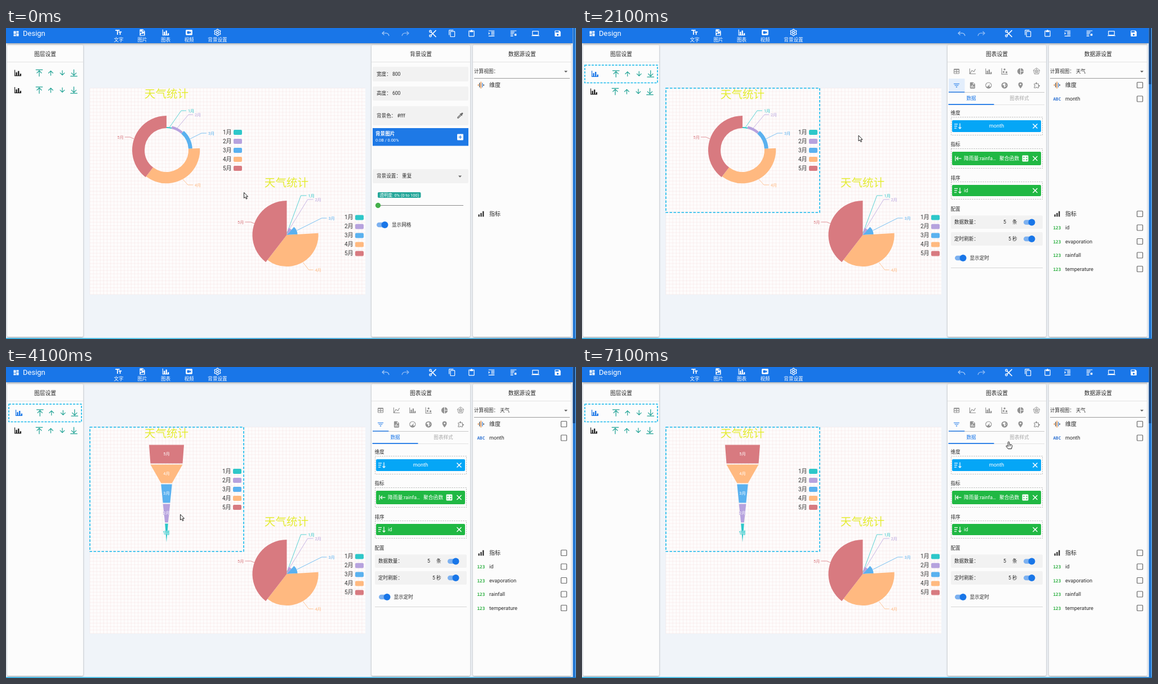
An HTML page with a canvas that plays this animation: 1012 px wide and 553 px high, repeating every 8000 ms.

```html
<!DOCTYPE html>
<html lang="zh-CN">
<head>
<meta charset="utf-8">
<title>Design</title>
<style>
html,body{margin:0;width:100%;height:100%;overflow:hidden;background:#f0f4f9}
canvas{display:block;width:1012px;height:553px}
</style>
</head>
<body>
<canvas id="stage" width="1012" height="553"></canvas>
<script>
const c = document.getElementById('stage').getContext('2d');
const FONT = 'Roboto, "Noto Sans CJK SC", "Noto Sans CJK JP", sans-serif';
const BLUE = '#1976e8', CYAN = '#14b8ec', TEAL = '#1fa294', GREEN = '#20b843', GRAY = '#929292', DARK = '#2b2b2b';
const COLORS = ['#2ec7c9', '#b6a2de', '#5ab1ef', '#ffb980', '#d87a80'];
const RAIN = [2.6, 5.9, 9, 26.4, 28.7];
const TOTAL = RAIN.reduce((a, b) => a + b), MAX = RAIN[4];
const month = i => i + 1 + '月';

// 24-unit icon outlines
const ICON = {
  dash: 'M13,3V9H21V3M13,21H21V11H13M3,21H11V15H3M3,13H11V3H3Z',
  text: 'M2,4V7H7V19H10V7H15V4H2M21,9H12V12H15V19H18V12H21V9Z',
  image: 'M14,2H6Q4,2 4,4V20Q4,22 6,22H18Q20,22 20,20V8ZM13,9V3.5L18.5,9ZM6,20L10,14L13,17L16,13L18,20ZM8,9.5A2,2 0 1,0 8,13A2,2 0 1,0 8,9.5Z',
  bars: 'M22,21H2V3H4V19H6V10H10V19H12V6H16V19H18V14H22V21Z',
  video: 'M18,16L14,12.8V16H6V8H14V11.2L18,8M20,4H4A2,2 0 0,0 2,6V18A2,2 0 0,0 4,20H20A2,2 0 0,0 22,18V6A2,2 0 0,0 20,4Z',
  copy: 'M19,21H8V7H19M19,5H8A2,2 0 0,0 6,7V21A2,2 0 0,0 8,23H19A2,2 0 0,0 21,21V7A2,2 0 0,0 19,5M16,1H4A2,2 0 0,0 2,3V17H4V3H16V1Z',
  paste: 'M5,3H9Q12,-1 15,3H19Q21,3 21,5V20Q21,22 19,22H5Q3,22 3,20V5Q3,3 5,3ZM5,5V20H19V5H17V8H7V5Z',
  laptop: 'M4,6H20V16H4M20,18A2,2 0 0,0 22,16V6C22,4.9 21.1,4 20,4H4C2.9,4 2,4.9 2,6V16A2,2 0 0,0 4,18H0V20H24V18Z',
  save: 'M15,9H5V5H15M12,19A3,3 0 1,1 12,13A3,3 0 1,1 12,19M17,3H5C3.9,3 3,3.9 3,5V19A2,2 0 0,0 5,21H19A2,2 0 0,0 21,19V7Z',
  linesA: 'M3,3H21V5H3ZM11,7H21V9H11ZM11,11H21V13H11ZM11,15H21V17H11ZM3,19H21V21H3ZM3,8V16L7,12Z',
  linesB: 'M3,3H21V5H3ZM3,7H15V9H3ZM3,11H13V13H3ZM3,15H11V17H3ZM3,19H11V21H3ZM15,13H21V19H15Z',
  up: 'M13,20H11V8L5.5,13.5L4.1,12.1L12,4.2L19.9,12.1L18.5,13.5L13,8Z',
  top: 'M4.1,11.9L12,4L19.9,11.9L18.5,13.3L13,7.8V22H11V7.8L5.5,13.3ZM2,2H22V4H2Z',
  table: 'M5,4H19A2,2 0 0,1 21,6V18A2,2 0 0,1 19,20H5A2,2 0 0,1 3,18V6A2,2 0 0,1 5,4M5,8V12H11V8H5M13,8V12H19V8H13M5,14V18H11V14H5M13,14V18H19V14H13Z',
  line: 'M16,11.8L20.2,4.5L22,5.5L16.7,14.5L10.2,10.8L5.5,19H22V21H2V3H4V17.5L9.5,8Z',
  scatter: 'M2,2H4V20H22V22H2ZM9,11A3,3 0 1,1 9,17A3,3 0 1,1 9,11ZM12,3A3,3 0 1,1 12,9A3,3 0 1,1 12,3ZM18,12A3,3 0 1,1 18,18A3,3 0 1,1 18,12Z',
  pie: 'M11,2V22C5.9,21.5 2,17.2 2,12C2,6.8 5.9,2.5 11,2M13,2V11H22C21.5,6.2 17.8,2.5 13,2M13,13V22C17.7,21.5 21.5,17.8 22,13Z',
  funnel: 'M6,13H18V11H6M3,6V8H21V6M10,18H14V16H10Z',
  doc: 'M14,2H6Q4,2 4,4V20Q4,22 6,22H18Q20,22 20,20V8ZM13,9V3.5L18.5,9ZM7,19V13H9V19ZM11,19V11H13V19ZM15,19V15H17V19Z',
  gauge: 'M12,2A10,10 0 1,1 12,22A10,10 0 1,1 12,2ZM12,4A8,8 0 0,0 5,16H9L16,8L14,16H19A8,8 0 0,0 12,4Z',
  globe: 'M12,2A10,10 0 1,1 12,22A10,10 0 1,1 12,2ZM10,5L5,10L11,13L10,19L16,15L13,11L16,7ZM18,9L19,14L17,12Z',
  pin: 'M12,11.5A2.5,2.5 0 1,1 12,6.5A2.5,2.5 0 1,1 12,11.5M12,2A7,7 0 0,0 5,9C5,14.2 12,22 12,22C12,22 19,14.2 19,9A7,7 0 0,0 12,2Z',
  puzzle: 'M4,6H9Q9,2 11.5,2T14,6H19V11Q23,11 23,13.5T19,16V21H14Q12,17 10,21H4V16Q8,13 4,11ZM6,8V10Q11,13 6,17V19H9Q12,15 15,19H17V8Z',
  plus: 'M17,13H13V17H11V13H7V11H11V7H13V11H17M19,3H5C3.9,3 3,3.9 3,5V19A2,2 0 0,0 5,21H19A2,2 0 0,0 21,19V5C21,3.9 20.1,3 19,3Z',
  calc: 'M4,2H20Q22,2 22,4V20Q22,22 20,22H4Q2,22 2,20V4Q2,2 4,2ZM5,7V9H10V7ZM14,7V9H19V7ZM5,15V17H10V15ZM14,14V15.5H19V14ZM14,17V18.5H19V17Z',
  signal: 'M3,14H7V21H3ZM10,9H14V21H10ZM17,3H21V21H17Z',
  dropper: 'M19.4,11.1L18,12.5L16.5,11.1L7.6,20H4V16.4L12.9,7.5L11.5,6L12.9,4.6L14.3,6L17,3.3Q19,2 20.7,3.3Q22,5 20.7,7L18,9.7ZM6,17.2V18H6.8L15.1,9.7L14.3,8.9Z'
};
for (const k in ICON) ICON[k] = new Path2D(ICON[k]);

function icon(name, x, y, size, color, flip) {
  c.save();
  c.translate(x, y);
  c.scale(size / 24, (flip ? -1 : 1) * size / 24);
  c.translate(-12, -12);
  c.fillStyle = color;
  c.fill(ICON[name], 'evenodd');
  c.restore();
}
function text(s, x, y, size = 8.6, color = DARK, align = 'left', weight = 400, font = FONT) {
  c.font = `${weight} ${size}px ${font}`;
  c.textAlign = align;
  c.fillStyle = color;
  c.fillText(s, x, y + size * .37);
}
function box(x, y, x2, y2, color, r = 0) {
  c.fillStyle = color;
  c.beginPath();
  c.roundRect(x, y, x2 - x, y2 - y, r);
  c.fill();
}
function line(pts, color, w = 1) {
  c.strokeStyle = color;
  c.lineWidth = w;
  c.beginPath();
  for (let i = 0; i < pts.length; i += 2) c.lineTo(pts[i], pts[i + 1]);
  c.stroke();
}
function dashed(x, y, x2, y2, color, w, dash) {
  c.setLineDash(dash);
  c.strokeStyle = color;
  c.lineWidth = w;
  c.strokeRect(x, y, x2 - x, y2 - y);
  c.setLineDash([]);
}
function disc(x, y, r, color) {
  c.fillStyle = color;
  c.beginPath();
  c.arc(x, y, r, 0, 7);
  c.fill();
}
function triangle(x, y) {
  c.fillStyle = '#666';
  c.beginPath();
  c.moveTo(x - 3, y - 1.5); c.lineTo(x + 3, y - 1.5); c.lineTo(x, y + 1.7);
  c.fill();
}
function toggle(x, y) {
  box(x, y - 4.3, x + 20, y + 4.3, '#7db1f0', 4.3);
  disc(x + 14.5, y, 6, BLUE);
}
function cross(x, y) {
  line([x - 4, y - 4, x + 4, y + 4], '#fff', 1.5);
  line([x - 4, y + 4, x + 4, y - 4], '#fff', 1.5);
}
function panel(x, x2, title) {
  c.save();
  c.shadowColor = 'rgba(0,0,0,.35)';
  c.shadowBlur = 3;
  c.shadowOffsetY = 1;
  box(x, 30, x2, 549, '#fcfcfc', 2);
  c.restore();
  text(title, (x + x2) / 2, 46, 9.8, DARK, 'center');
  line([x, 60.5, x2, 60.5], '#e4e4e4');
}

function turnArrow(x, dir, color) {
  c.save();
  c.translate(x, 10);
  c.scale(dir, 1);
  c.strokeStyle = color;
  c.lineWidth = 1.3;
  c.beginPath();
  c.moveTo(-2.5, -4); c.lineTo(-6, -.8); c.lineTo(-2.5, 2.4);
  c.moveTo(-6, -.8); c.lineTo(1, -.8);
  c.quadraticCurveTo(5, -.6, 6, 4);
  c.stroke();
  c.restore();
}
function scissors(x, y) {
  line([x + 6, y + 6, x - 4, y - 4], '#fff', 1.7);
  line([x + 6, y - 6, x - 4, y + 4], '#fff', 1.7);
  for (const s of [-1, 1]) {
    disc(x - 4, y + s * 4, 2.4, '#fff');
    disc(x - 4, y + s * 4, 1.1, BLUE);
  }
}
function cog(x, y) {
  c.strokeStyle = '#fff';
  c.lineWidth = 1.3;
  c.beginPath();
  for (let i = 0; i <= 72; i++) {
    const a = i / 72 * Math.PI * 2, r = 5.1 + .8 * Math.cos(a * 6);
    c.lineTo(x + r * Math.sin(a), y + r * Math.cos(a));
  }
  c.stroke();
  c.beginPath();
  c.arc(x, y, 2, 0, 7);
  c.stroke();
}
function header() {
  c.save();
  c.shadowColor = 'rgba(0,0,0,.4)';
  c.shadowBlur = 4;
  c.shadowOffsetY = 1;
  box(0, 0, 1006, 27, BLUE);
  c.restore();
  icon('dash', 18, 10, 12, '#fff');
  text('Design', 30, 9.5, 13, '#fff', 'left', 400);
  [['文字', 200, 'text'], ['图片', 242, 'image'], ['图表', 283.5, 'bars'], ['视频', 325, 'video'], ['背景设置', 375.5]]
    .forEach(([s, x, name]) => {
      name ? icon(name, x, 8, 14, '#fff') : cog(x, 8);
      text(s, x, 21.3, 8.6, '#fff', 'center');
    });
  turnArrow(674, 1, '#a3c8f6');
  turnArrow(709, -1, '#8cb9f3');
  scissors(757.5, 10);
  [['copy', 792], ['paste', 826.5], ['linesA', 862], ['linesB', 901], ['laptop', 940], ['save', 979.5]]
    .forEach(([n, x]) => icon(n, x, 9.7, 14, '#fff'));
}

function layerRow(x, y, color) {
  icon('bars', x, y, 14.5, color);
  const gap = color === BLUE ? 1.3 : 0;
  ['top', 'up', 'up', 'top'].forEach((n, i) =>
    icon(n, 59 + i * 20.5 + gap, y, n === 'top' ? 15 : 14, TEAL, i > 1));
}
function layers(sel) {
  panel(2, 137, '图层设置');
  if (sel) {
    dashed(5, 66, 134, 97.5, CYAN, 1.6, [4, 2]);
    layerRow(23, 81.5, BLUE);
    layerRow(21, 113, '#222');
  } else {
    layerRow(21, 80, '#222');
    layerRow(21, 110.5, '#222');
  }
}

function sheet() {
  box(149, 107, 638, 474, '#fefcfc');
  const step = 6.113;
  for (let x = 149; x < 638; x += step) line([x, 107, x, 474], 'rgba(235,190,190,.24)', .8);
  for (let y = 107; y < 474; y += step) line([149, y, 638, y], 'rgba(235,190,190,.24)', .8);
}
function legend(x, y) {
  COLORS.forEach((k, i) => {
    text(month(i), x, y + i * 16, 10, '#333');
    box(x + 19, y + i * 16 - 4, x + 34, y + i * 16 + 5, k, 2);
  });
}
function chartTitle(x, y) { text('天气统计', x, y, 19.6, '#e4ec33', 'center'); }

// leads: start, elbow and end of each label line, relative to the centre
function rose(x, y, inner, leads) {
  let a = -Math.PI / 2;
  RAIN.forEach((v, i) => {
    const b = a + v / TOTAL * Math.PI * 2, r = inner + (61 - inner) * v / MAX;
    c.fillStyle = COLORS[i];
    c.beginPath();
    c.arc(x, y, r, a, b);
    c.arc(x, y, inner, b, a, true);
    c.fill();
    a = b;
    const [sx, sy, ex, ey, tx] = leads[i];
    line([x + sx, y + sy, x + ex, y + ey, x + tx, y + ey], COLORS[i], .8);
    text(month(i), x + tx + (tx > 0 ? 3 : -2), y + ey, 7.3, COLORS[i], tx > 0 ? 'left' : 'right');
  });
}
const RING_LEADS = [[5, -40, 26, -70, 35], [19, -39, 39, -63, 47], [42, -20, 62, -30, 71], [29, 52, 38, 62, 47], [-58, -20, -65, -23, -74]];
const PIE_LEADS = [[1, -5, 25, -70, 35], [5, -11, 37, -63, 47], [18, -8, 62, -30, 71], [29, 49, 39, 62, 47], [-57, -20, -64, -23, -74]];

function funnel(hot) {
  const bright = { 2: '#67c4ff', 4: '#f08890' };
  RAIN.forEach((v, i) => {
    const y = 138.5 + (4 - i) * 35, w = v / MAX * 31, w2 = (RAIN[i - 1] || 0) / MAX * 31;
    c.fillStyle = i === hot ? bright[i] : COLORS[i];
    c.beginPath();
    c.moveTo(285 - w, y); c.lineTo(285 + w, y);
    c.lineTo(285 + w2, y + 33); c.lineTo(285 - w2, y + 33);
    c.fill();
  });
  RAIN.forEach((v, i) => {
    const y = 155 + (4 - i) * 35 - .5, size = i === hot ? 11 : 7.3;
    c.font = `400 ${size}px ${FONT}`;
    c.textAlign = 'center';
    c.strokeStyle = COLORS[i];
    c.lineWidth = 1.3;
    c.lineJoin = 'round';
    c.strokeText(month(i), 285, y + size * .37);
    text(month(i), 285, y, size, '#fff', 'center');
  });
}
function tooltip(x, y, w, s) {
  box(x, y, x + w, y + 33, 'rgba(50,50,50,.56)', 2.5);
  text('降雨量', x + 3, y + 10.5, 8.6, '#fff');
  text(s, x + 3, y + 23, 8.6, '#fff');
}
function handles() {
  for (const x of [146, 285, 424]) for (const y of [104, 217, 330]) {
    if (x === 285 && y === 217) continue;
    box(x - 2.5, y - 2.5, x + 2.5, y + 2.5, '#fff');
    c.strokeStyle = '#333';
    c.lineWidth = 1;
    c.strokeRect(x - 2.5, y - 2.5, 5, 5);
  }
}

function backgroundPanel() {
  panel(649, 824, '背景设置');
  [[69, 95, '宽度： 800'], [104, 129, '高度： 600'], [139, 173, '背景色： #fff'], [251, 276, '背景设置： 重复']]
    .forEach(([y, y2, s]) => {
      box(651, y, 821, y2, '#f2f2f2', 2);
      text(s, 658, (y + y2) / 2 - .5);
    });
  icon('dropper', 806, 156, 14, '#666');
  triangle(806, 264);
  box(651, 178, 821, 209.5, '#1e79e6');
  text('背景图片', 656, 188, 8.6, '#fff', 'left', 700);
  text('0.0B / 0.00%', 656, 199, 7.4, '#fff');
  icon('plus', 806.5, 194, 14.5, '#fff');
  box(660, 292, 736.5, 302, '#22a699', 2);
  text('透明度: 0% (0 to 100)', 698.3, 297, 7.5, '#fff', 'center');
  line([660, 315.5, 812, 315.5], '#8c8c8c');
  disc(660.5, 315.5, 4.7, '#45b04b');
  toggle(658, 350);
  text('显示网格', 685, 350);
}

const TYPES = ['table', 'line', 'bars', 'scatter', 'pie', 'radar', 'funnel', 'doc', 'gauge', 'globe', 'pin', 'puzzle'];
function radar(x, y, color) {
  const at = (i, r) => [x + r * Math.sin(i * Math.PI * .4), y - r * Math.cos(i * Math.PI * .4)];
  for (const r of [6, 3]) line([0, 1, 2, 3, 4, 5].flatMap(i => at(i, r)), color, .9);
  for (let i = 0; i < 5; i++) line([x, y, ...at(i, 6)], color, .7);
}
function sortIcon(x, y) {
  for (let i = 0; i < 3; i++) line([x, y - 3.5 + i * 3.5, x + 6 - i, y - 3.5 + i * 3.5], '#fff', 1.2);
  line([x + 10, y - 5, x + 10, y + 4.5], '#fff', 1.2);
  line([x + 7.7, y + 2, x + 10, y + 4.6, x + 12.3, y + 2], '#fff', 1.2);
}
function field(label, y, top, bottom, pillTop, pillBottom, color) {
  text(label, 654.5, y);
  dashed(655.5, top + .5, 817.5, bottom + .5, '#b4b4b4', 1, [2, 2]);
  box(657, pillTop, 815, pillBottom, color, 2);
  cross(804.5, (pillTop + pillBottom) / 2);
}
function chartPanel(type, lit) {
  panel(649, 824, '图表设置');
  const sel = TYPES.indexOf(type);
  if (lit) box(651, 90, 679.5, 113, '#e3eefc');
  line([651, 114.5, 821, 114.5], '#c8c8c8');
  TYPES.forEach((n, i) => {
    const x = 665 + i % 6 * 28.4, y = i < 6 ? 77 : 102, color = i === sel ? BLUE : GRAY;
    n === 'radar' ? radar(x, y, color) : icon(n, x, y, 13.5, color);
    if (i === sel) box(x - 14, y + 11.3, x + 14.3, y + 12.7, BLUE);
  });
  text('数据', 691, 125, 8.6, BLUE, 'center');
  text('图表样式', 776.5, 125, 8.6, '#a8a8a8', 'center');
  line([651, 136.5, 821, 136.5], '#e2e2e2');
  box(650.5, 135, 731.5, 136.7, BLUE);

  field('维度', 151, 158, 190, 164, 185, '#05a6f6');
  sortIcon(661, 174.5);
  text('month', 736, 174, 9.2, '#fff', 'center');
  field('指标', 207, 214, 249, 220, 244, GREEN);
  line([663, 227.5, 663, 236.5], '#fff', 1.2);
  line([665, 232, 673.5, 232], '#fff', 1.2);
  line([668, 229, 665, 232, 668, 235], '#fff', 1.2);
  text('降雨量:rainfa…', 678, 231.7, 8.8, '#fff');
  text('聚合函数', 741, 231.7, 8.8, '#fff');
  icon('calc', 787, 232, 13, '#fff');
  field('排序', 267, 273, 304, 279, 299, GREEN);
  sortIcon(661, 289);
  text('id', 678, 289, 9.2, '#fff');

  text('配置', 654.5, 321.5);
  box(655, 333.5, 818, 357, '#f2f2f2', 2);
  text('数据数量：', 661, 345);
  text('5', 748, 345, 8.8);
  text('条', 764, 345);
  toggle(784, 345.5);
  box(655, 363, 818, 387, '#f2f2f2', 2);
  text('定时刷新：', 661, 374.5);
  text('5 秒', 757, 374.5);
  toggle(784, 375);
  toggle(662, 409);
  text('显示定时', 688.5, 409);
  line([655, 426.5, 818, 426.5], '#d6d6d6');
}

function dataPanel(on) {
  panel(829, 1003.5, '数据源设置');
  text('计算视图：', 831, 76.5);
  if (on) text('天气', 877, 76.5);
  triangle(994, 77.5);
  line([831, 89.5, 1001, 89.5], '#9a9a9a');
  ['#e98b3a', '#444', '#e98b3a', '#3d7fd0', '#444'].forEach((k, i) => {
    const h = [1.5, 4, 6, 4, 1.5][i];
    line([838.5 + i * 2.4, 101.5 - h, 838.5 + i * 2.4, 101.5 + h], k, 1.3);
  });
  text('维度', 858, 101.5, 10);
  icon('signal', 843.5, 330.5, 13, '#222');
  text('指标', 858, 330.5, 10);
  if (!on) return;
  const mono = '"DejaVu Sans Mono", monospace';
  const rows = [['month', 126], ['id', 355], ['evaporation', 379.5], ['rainfall', 404], ['temperature', 428.5]];
  rows.forEach(([s, y], i) => {
    text(i ? '123' : 'ABC', 836.5, y + .3, 7.6, i ? '#27ae3c' : '#2f72d2', 'left', 700, mono);
    text(s, 858, y, 9.2);
  });
  for (const y of [101.5, 330.5, ...rows.map(r => r[1])]) {
    c.strokeStyle = '#666';
    c.lineWidth = 1.2;
    c.beginPath();
    c.roundRect(985.5, y - 5, 10, 10, 1);
    c.stroke();
  }
}

function windowEdge(on) {
  box(1004.5, 28, 1007, 553, '#eef2f6');
  box(1006.5, 0, 1012, 553, '#1d73d2');
  box(1010.5, 0, 1012, 553, '#5ea4e4');
  if (on) box(1006.5, 0, 1010.5, 100, '#17457f');
  const g = c.createLinearGradient(0, 0, 1012, 0);
  ['#27a9e0', '#4fc9ee', '#2f9ddb', '#58c4ea', '#1d78c4'].forEach((k, i) => g.addColorStop(i / 4, k));
  box(0, 551.3, 1012, 553, g);
}

const ARROW = new Path2D('M0,0V10L2.3,8L4,11.6L5.6,10.9L4,7.3H7Z');
const HAND = new Path2D('M-1.2,1Q0,-.6 1.2,1V5L5.5,6Q6.3,6.3 6.2,8L5,13H-1L-4.5,8.5Q-4.5,6.8 -2.8,7.5L-1.2,8.8Z');
function cursor(x, y, hand) {
  c.save();
  c.translate(x, y);
  c.fillStyle = '#fff';
  c.strokeStyle = '#222';
  c.lineWidth = 1;
  c.lineJoin = 'round';
  c.fill(hand ? HAND : ARROW);
  c.stroke(hand ? HAND : ARROW);
  if (hand) for (const k of [1.2, 3]) line([k, 6, k, 8.5], '#222', .7);
  c.restore();
}

const SCENES = [
  { at: 0, mouse: [422.5, 292.5], off: 0 },
  { at: 100, mouse: [312.5, 226.5], sel: 'pie', off: 1, grips: true },
  { at: 1100, mouse: [692, 150], sel: 'pie', off: 0, grips: true },
  { at: 2100, mouse: [491, 191], sel: 'funnel', off: 0, lit: true },
  { at: 3100, mouse: [475, 190], sel: 'funnel', funnel: true },
  { at: 4100, mouse: [309.5, 262], sel: 'funnel', funnel: true },
  { at: 5100, mouse: [284.5, 208, true], sel: 'funnel', funnel: true, hot: 2, tip: [295.5, 272.5, 32.5, '3月 : 9'] },
  { at: 6100, mouse: [289, 160, true], sel: 'funnel', funnel: true, hot: 4, tip: [301, 178, 44, '5月 : 28.7'] },
  { at: 7100, mouse: [757.5, 132.5, true], sel: 'funnel', funnel: true }
];

function draw(s) {
  const off = s.off || 0;
  box(0, 0, 1012, 553, '#f0f4f9');
  sheet();
  chartTitle(285 + off, 117 + off + (s.sel && !off ? 1 : 0));
  if (s.funnel) funnel(s.hot);
  else rose(285 + off, 217 + off, 39, RING_LEADS);
  legend(385 + (s.sel && !off ? -1 : off), 185 + off);
  chartTitle(498, 275);
  rose(498.5, 368, 0, PIE_LEADS);
  legend(601, 336.5);
  if (s.sel) dashed(149, 107, 422, 328, CYAN, 1.6, [4.5, 2.5]);
  if (s.grips) handles();
  if (s.tip) tooltip(...s.tip);
  layers(s.sel);
  s.sel ? chartPanel(s.sel, s.lit) : backgroundPanel();
  dataPanel(s.sel);
  header();
  windowEdge(s.sel);
  cursor(...s.mouse);
}

const start = performance.now();
function tick(now) {
  const t = Math.max(0, now - start) % 8000;
  draw(SCENES.findLast(s => s.at <= t));
  requestAnimationFrame(tick);
}
draw(SCENES[0]);
requestAnimationFrame(tick);
</script>
</body>
</html>
```
